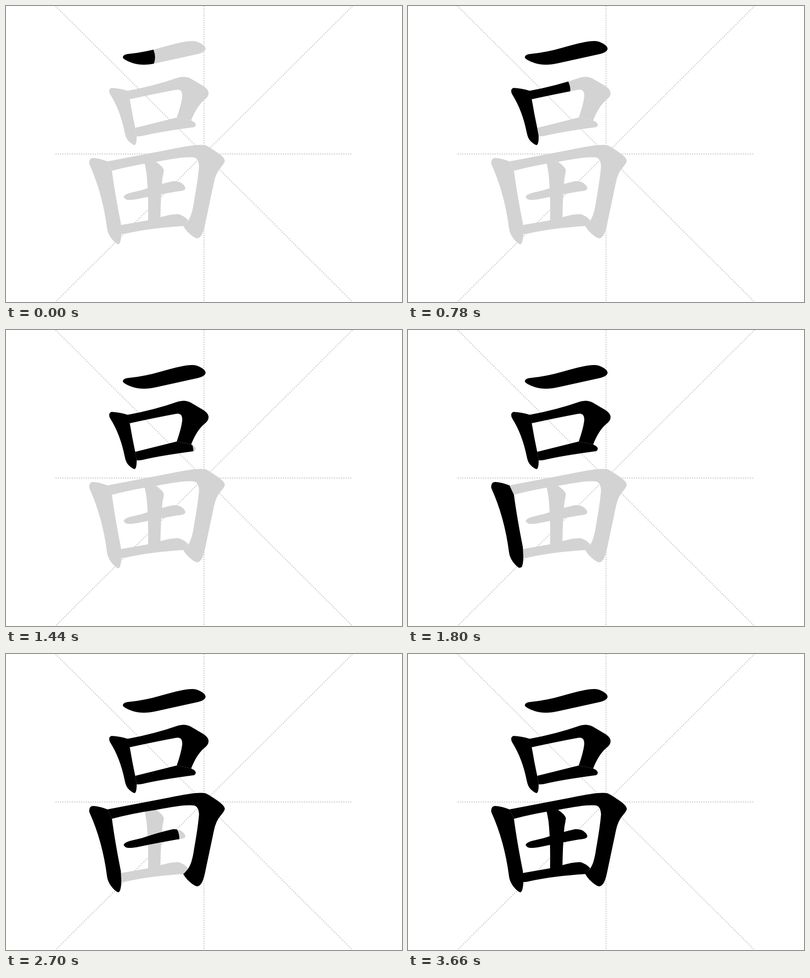
Write an HTML page with a canvas that moves like this. It is 800 px wide and 600 px high and loops after 3.72 s.

```html
<!DOCTYPE html>
<html lang="en">
<head>
<meta charset="utf-8">
<title>Stroke order</title>
<style>
  html, body { margin: 0; width: 800px; height: 600px; overflow: hidden; background: #fff; }
  canvas { display: block; }
</style>
</head>
<body>
<canvas id="stage" width="800" height="600"></canvas>
<script>
const ctx = document.getElementById('stage').getContext('2d');
const LOOP = 3720, STEP = 60, BRUSH = 75;
const GRAY = '#d3d3d3', INK = '#000';

// begin and end count steps; the brush follows spine, clipped to outline
const stroke = (begin, end, spine, outline) => {
  const pts = spine.split(' ').map(p => p.split(',').map(Number));
  let length = 0;
  for (let i = 1; i < pts.length; i++) {
    length += Math.hypot(pts[i][0] - pts[i - 1][0], pts[i][1] - pts[i - 1][1]);
  }
  return { begin, end, length, line: new Path2D('M' + spine), shape: new Path2D(outline) };
};

const strokes = [
  stroke(-1.1, 7, '243,104 280,104 393,83',
    'M236 104Q236 98 249 97Q280 94 314 84Q362 70 378 71Q386 71 397 78Q404 83 403 88Q401 94 389 97L303 116Q277 122 257 116Q237 109 236 104Z'),
  stroke(7, 10.8, '216,172 235,200 258,272',
    'M209 176Q207 168 213 166Q231 167 246 172L250 189Q255 219 261 247L264 264Q264 282 259 282Q252 279 246 272Q242 267 240 257Q231 212 211 180Z'),
  stroke(10.8, 21, '246,180 350,157 383,178 358,238',
    'M245 172Q300 162 348 145Q362 141 373 147L400 163Q411 171 409 179Q408 185 400 191Q385 204 374 232L345 226Q354 200 356 184Q357 167 343 170Q300 178 250 189Z'),
  stroke(21, 25.4, '266,256 376,240',
    'M261 247L345 226L374 232Q385 237 383 242Q382 246 377 246Q310 255 277 263Q268 265 264 264Z'),
  stroke(25.4, 31, '175,316 196,350 225,474',
    'M168 319Q168 308 176 308Q190 309 205 315L214 334Q220 380 232 440L233 462Q232 482 227 483Q221 482 212 470Q205 460 204 450Q195 380 169 322Z'),
  stroke(31, 42.2, '208,325 385,293 415,315 385,462',
    'M205 315L330 291Q385 279 402 282Q408 284 424 295Q442 307 442 314Q441 319 434 327Q424 338 420 358L404 434Q400 455 396 463Q391 471 386 471Q379 470 366 457Q361 451 358 446Q362 443 368 435Q376 424 380 395Q388 350 390 325Q389 309 380 307Q362 304 303 316Q255 323 214 334Z'),
  stroke(42.2, 46.7, '243,386 355,366',
    'M238 388Q237 383 250 379L275 373Q310 361 338 355Q352 355 357 361Q363 366 362 371Q360 375 345 376Q300 384 267 391Q245 395 241 391Z'),
  stroke(46.7, 51.6, '290,322 300,438',
    'M280 319L303 316Q317 325 319 333Q318 340 316 350Q313 380 312 428Q311 442 297 444Q287 444 287 434Q288 380 284 340Q282 327 280 319Z'),
  stroke(51.6, 58, '232,453 365,440',
    'M232 444L289 434Q300 430 312 428Q335 421 349 422Q359 425 368 434Q363 443 358 446Q295 450 248 460Q235 463 232 462Z')
];

function drawGrid() {
  ctx.save();
  ctx.translate(100, 0);
  ctx.scale(600 / 256, 600 / 256);
  ctx.strokeStyle = GRAY;
  ctx.lineWidth = 1;
  ctx.setLineDash([1, 1]);
  ctx.stroke(new Path2D('M0 0L256 256M256 0L0 256M128 0V256M0 128H256'));
  ctx.restore();
}

function drawInk(s, step) {
  const progress = (step - s.begin) / (s.end - s.begin);
  if (progress <= 0) return;
  ctx.fillStyle = ctx.strokeStyle = INK;
  if (progress >= 1) {
    ctx.fill(s.shape);
    return;
  }
  ctx.save();
  ctx.clip(s.shape);
  ctx.lineWidth = BRUSH;
  ctx.lineCap = ctx.lineJoin = 'round';
  ctx.setLineDash([progress * s.length, 2000]);
  ctx.stroke(s.line);
  ctx.restore();
}

function render(time) {
  const step = Math.floor((time % LOOP) / STEP);
  ctx.fillStyle = '#fff';
  ctx.fillRect(0, 0, 800, 600);
  drawGrid();
  ctx.fillStyle = GRAY;
  strokes.forEach(s => ctx.fill(s.shape));
  strokes.forEach(s => drawInk(s, step));
}

const start = performance.now();
function tick() {
  render(performance.now() - start);
  requestAnimationFrame(tick);
}
tick();
</script>
</body>
</html>
```
